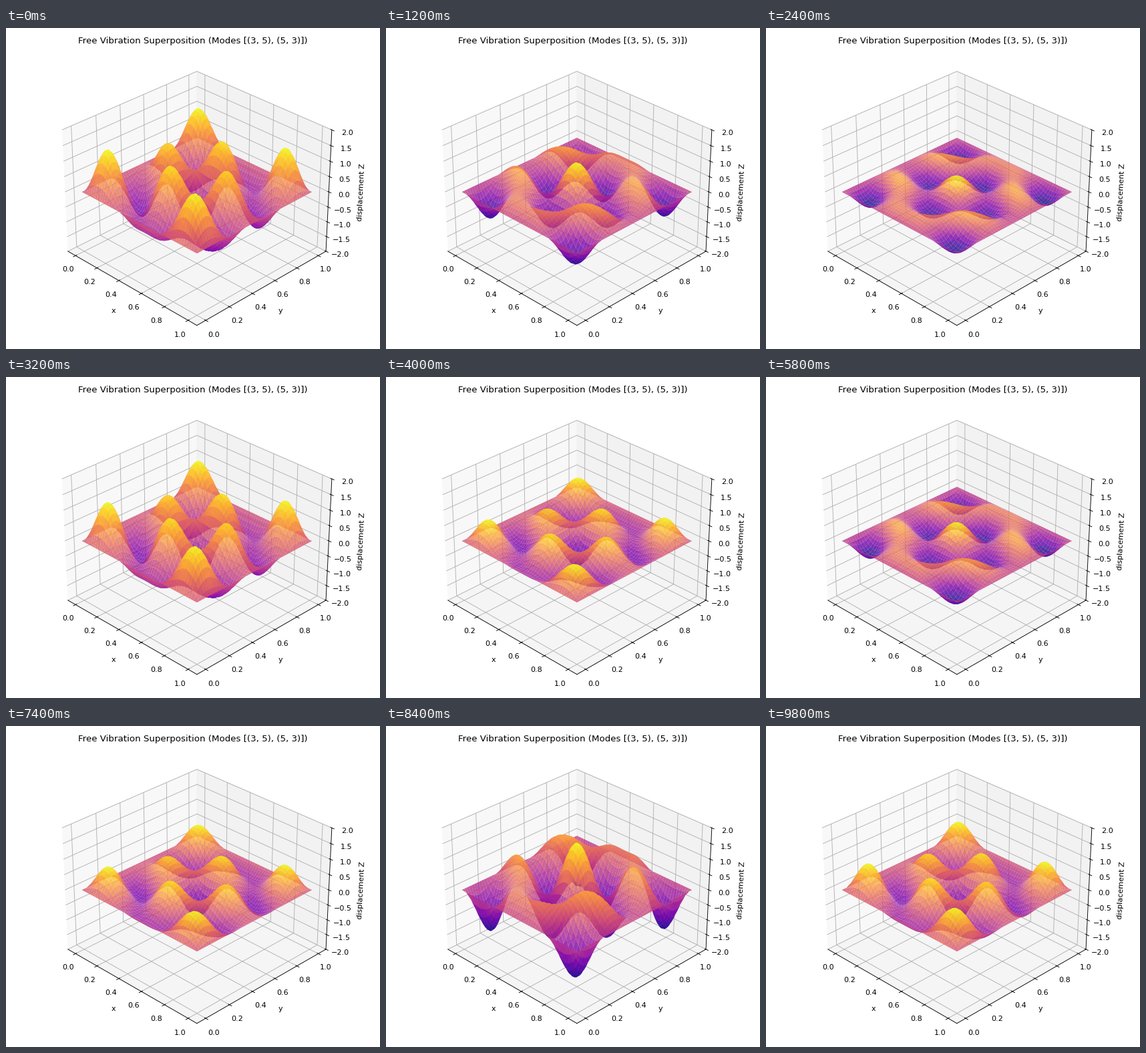
Write a matplotlib script that moves like this. It is 560 by 480 pixels and loops after 10000 ms.

```python
import numpy as np
import matplotlib.pyplot as plt
from matplotlib.animation import FuncAnimation

W, H, DPI = 560, 480, 80
FRAMES, INTERVAL = 50, 200
MODES = [(3, 5), (5, 3)]
AMPS = [1.0, 0.6]
DT = 1 / FRAMES

axis = np.linspace(0, 1, 100)
X, Y = np.meshgrid(axis, axis)


def displacement(t):
    """Sum of the standing waves of a unit square membrane."""
    z = np.zeros_like(X)
    for (m, n), amp in zip(MODES, AMPS):
        omega = np.pi * np.hypot(m, n)
        shape = np.sin(m * np.pi * X) * np.sin(n * np.pi * Y)
        z += amp * shape * np.cos(omega * t)
    return z


fig = plt.figure(figsize=(W / DPI, H / DPI), dpi=DPI)
side = 434
ax = fig.add_axes(((W - side) / 2 / W, 12 / H, side / W, side / H),
                  projection="3d")
ax.view_init(elev=30, azim=-45)
ax.set_title(f"Free Vibration Superposition (Modes {MODES})", pad=10)
ax.set_xlabel("x")
ax.set_ylabel("y")
ax.set_zlabel("displacement Z")

margin = 0.05 + 1.1 / 48
ax.set_xlim(-margin, 1 + margin)
ax.set_ylim(-margin, 1 + margin)
ax.set_zlim(-2, 2)


def update(i):
    for surf in list(ax.collections):
        surf.remove()
    ax.plot_surface(X, Y, displacement(i * DT), cmap="plasma", alpha=0.8)
    return ax.collections


anim = FuncAnimation(fig, update, frames=FRAMES, interval=INTERVAL,
                     init_func=lambda: update(0), repeat=True, repeat_delay=0)
plt.show()
```
